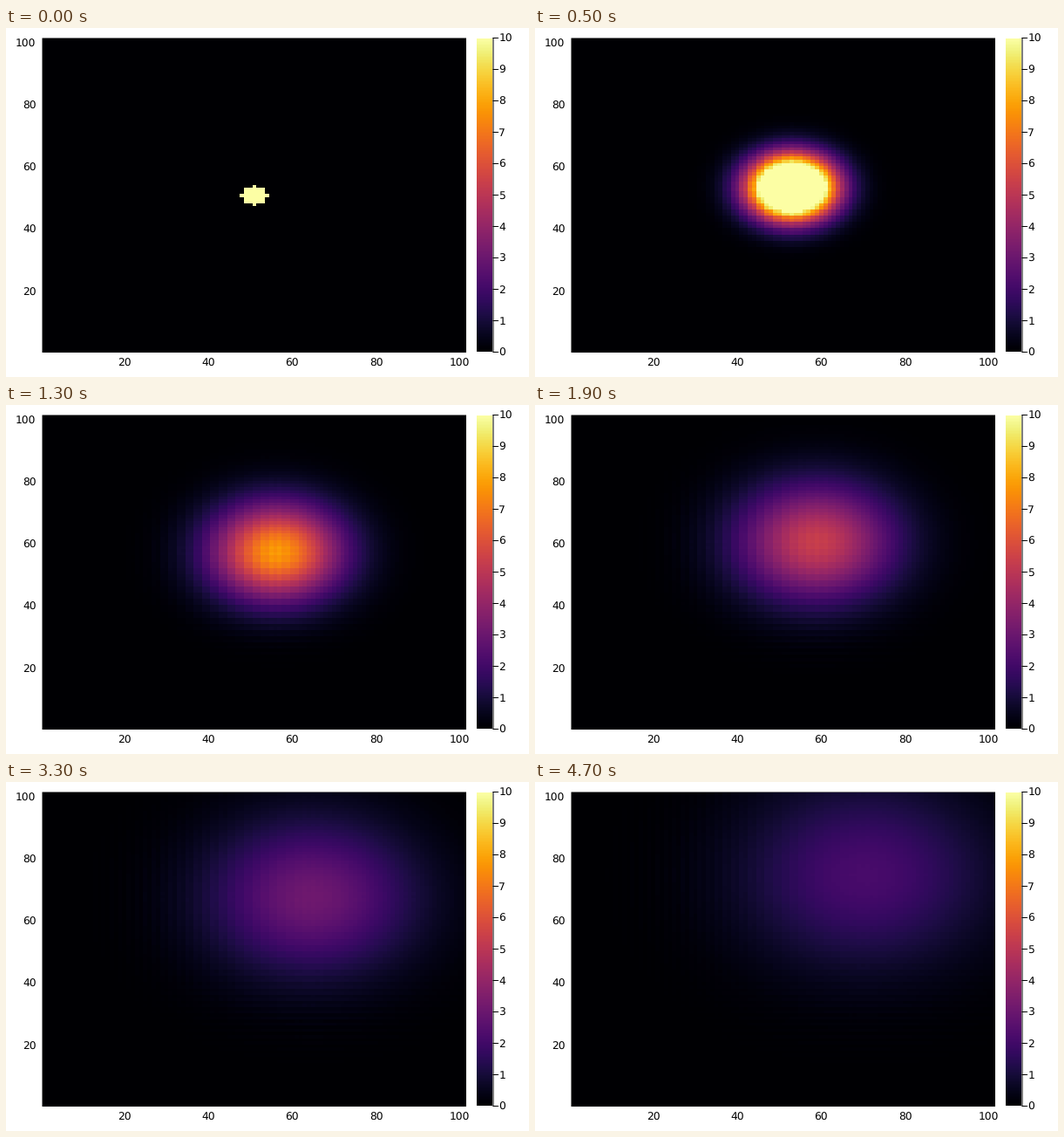
These frames come from a looping animation (600x400 px, 5.1 s). A matplotlib script:

```python
import numpy as np
import matplotlib.pyplot as plt
from matplotlib.animation import FuncAnimation
from matplotlib.patches import Rectangle

plt.rcParams["text.hinting"] = "none"

W, H, DPI = 600, 400, 100
FRAMES, STEP_MS = 51, 100
N, START, LEVEL = 101, 51, 200
SPREAD_0, SPREAD = 2.3, 9.0
LEFT, RIGHT, TOP, BOTTOM = 42, 528, 12, 372
FONT = dict(family="DejaVu Sans", size=12.2 * 72 / DPI, color="black")

cells = np.arange(1, N + 1)
offset = cells - START
disc = np.where(offset[:, None] ** 2 + offset ** 2 <= 9, LEVEL, 0.0)


def profile(n, speed):
    """Drifting, spreading bell with an odd-even ripple on its trailing side."""
    var = SPREAD_0 + SPREAD * n
    bell = np.exp(-(offset - speed * n) ** 2 / (2 * var))
    ripple = np.minimum(0.02 * np.exp(-2 * speed / SPREAD * offset), 0.5)
    return bell * (1 + np.where(cells % 2, ripple, -ripple))


def field(n):
    if n == 0:
        return disc
    peak = disc.sum() / (2 * np.pi * (SPREAD_0 + SPREAD * n))
    return peak * np.outer(profile(n, 0.51), profile(n, 0.41))


fig = plt.figure(figsize=(W / DPI, H / DPI), dpi=DPI, facecolor="white")
ax = fig.add_axes([0, 0, 1, 1])
ax.axis("off")

ax.add_patch(Rectangle((LEFT - 0.5, TOP - 0.5), RIGHT - LEFT + 0.5,
                       BOTTOM - TOP + 0.5, fc="black", lw=0, snap=False, zorder=-1))
style = dict(cmap="inferno", origin="lower", aspect="auto", interpolation="nearest")
heat = ax.imshow(field(0), vmin=0, vmax=10,
                 extent=(LEFT, RIGHT, BOTTOM, TOP), **style)
ax.imshow(np.linspace(0, 1, 256)[:, None], extent=(540, 558, 371, TOP), **style)

for v in range(20, 101, 20):
    x = LEFT + (v - 0.5) * (RIGHT - LEFT) / N
    y = BOTTOM - (v - 0.5) * (BOTTOM - TOP) / N
    ax.text(x, 383, str(v), ha="center", va="center_baseline", **FONT)
    ax.text(34.5, y - 0.5, str(v), ha="right", va="center_baseline", **FONT)

line = dict(color="black", lw=0.72, snap=False)
ax.plot([559, 559], [TOP - 0.5, 371.5], **line)
for v in range(11):
    y = 371.5 - v * 36
    ax.plot([559, 564.5], [y, y], **line)
    ax.text(565.5, y, str(v), ha="left", va="center_baseline", **FONT)

ax.set_xlim(0, W)
ax.set_ylim(H, 0)


def update(n):
    heat.set_data(field(n))
    return (heat,)


anim = FuncAnimation(fig, update, frames=FRAMES, interval=STEP_MS,
                     repeat=True, repeat_delay=0, blit=False)
plt.show()
```
